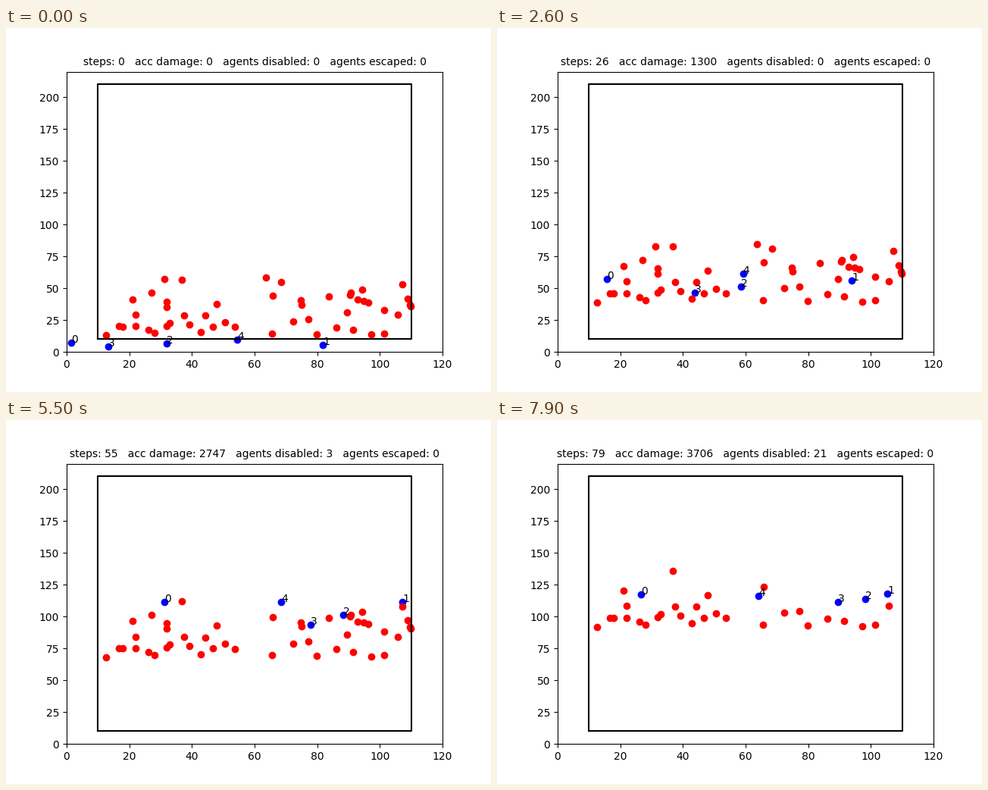
A matplotlib script for the animation above (8000 ms loop, 640 by 480 pixels).

```python
import numpy as np
import matplotlib.pyplot as plt
from matplotlib.animation import FuncAnimation

STEPS = 80
SPEED = 2.0      # chaser speed, runners climb 1 per step
LINE = 111.25    # height at which chasers wait
MEET = 109.95    # a runner this high is within reach of the line

# Each chaser: start, runners to intercept in turn, where it heads last
CHASERS = [
    ((1.5, 7.1), [(31.2, 57.1), (27.1, 46.4), (32, 39.5), (32, 35.4)],
     (26.7, 117.2)),
    ((81.8, 5.4), [(107.2, 53), (108.9, 41.9), (109.7, 37), (109.9, 35.6)],
     (105.3, 117.7)),
    ((32, 6.6), [(94.4, 48.8), (90.8, 46.4), (90.6, 45), (94.9, 40.2),
                 (96.4, 39), (101.4, 33)], (98.3, 113.7)),
    ((13.4, 4.3), [(90.8, 46.4), (93, 41), (94.9, 40.2), (89.4, 31.1)],
     (89.4, LINE)),
    ((54.5, 9.6), [(63.7, 58.7), (68.5, 55), (83.8, 43.8), (74.8, 40.4),
                   (75.1, 37.3)], (64.1, 115.9)),
]


def toward(pos, goal):
    """Move one step at constant speed without overshooting."""
    gap = np.subtract(goal, pos)
    dist = np.hypot(*gap)
    return pos + gap * min(1, SPEED / dist) if dist > 0 else pos


def hunt(start, prey, last, caught):
    """Return the chaser's track and note when each runner is caught."""
    pos, queue, track = np.array(start, float), list(prey), []
    for step in range(STEPS):
        track.append(pos)
        if queue:
            x, y = queue[0]
            if np.allclose(pos, (x, LINE)) and y + step >= MEET:
                caught.setdefault(queue.pop(0), step)
        pos = toward(pos, (queue[0][0], LINE) if queue else last)
    return track


def crowd(rng):
    """Runners too low to be met: a wide group left, a looser one right."""
    x = np.append(np.linspace(12.6, 52.3, 16), np.linspace(66, 105.8, 9))
    x[1:-1] += rng.uniform(-1.5, 1.5, x.size - 2)
    return np.column_stack([x, rng.uniform(10.3, 30, x.size)])


caught = {}
tracks = np.array([hunt(*chaser, caught) for chaser in CHASERS])
taken = np.array(list(caught.values()))
prey = np.array(list(caught))
slipped = [(36.8, 56.9), (21.1, 41.3), (65.9, 44.3), (48, 37.7)]
free = np.vstack([slipped, crowd(np.random.default_rng(4))])
total = len(prey) + len(free)

fig, ax = plt.subplots(figsize=(6.4, 4.8), dpi=100)
ax.set_xlim(0, 120)
ax.set_ylim(0, 220)
chasers, = ax.plot([], [], "bo")
runners, = ax.plot([], [], "ro")
ax.plot([10, 110, 110, 10, 10], [10, 10, 210, 210, 10], color="black")
labels = [ax.text(0, 0, str(i)) for i in range(len(CHASERS))]
title = ax.set_title("", fontsize=10)


def update(step):
    spots = tracks[:, step]
    chasers.set_data(spots.T)
    for label, spot in zip(labels, spots):
        label.set_position(spot)

    alive = np.vstack([prey[taken > step], free])
    runners.set_data(alive[:, 0], alive[:, 1] + step)

    damage = total * step - np.maximum(0, step - taken).sum()
    title.set_text(f"steps: {step}   acc damage: {damage}   "
                   f"agents disabled: {total - len(alive)}   agents escaped: 0")
    return [chasers, runners, title, *labels]


anim = FuncAnimation(fig, update, frames=STEPS, interval=100, repeat=True)
plt.show()
```
